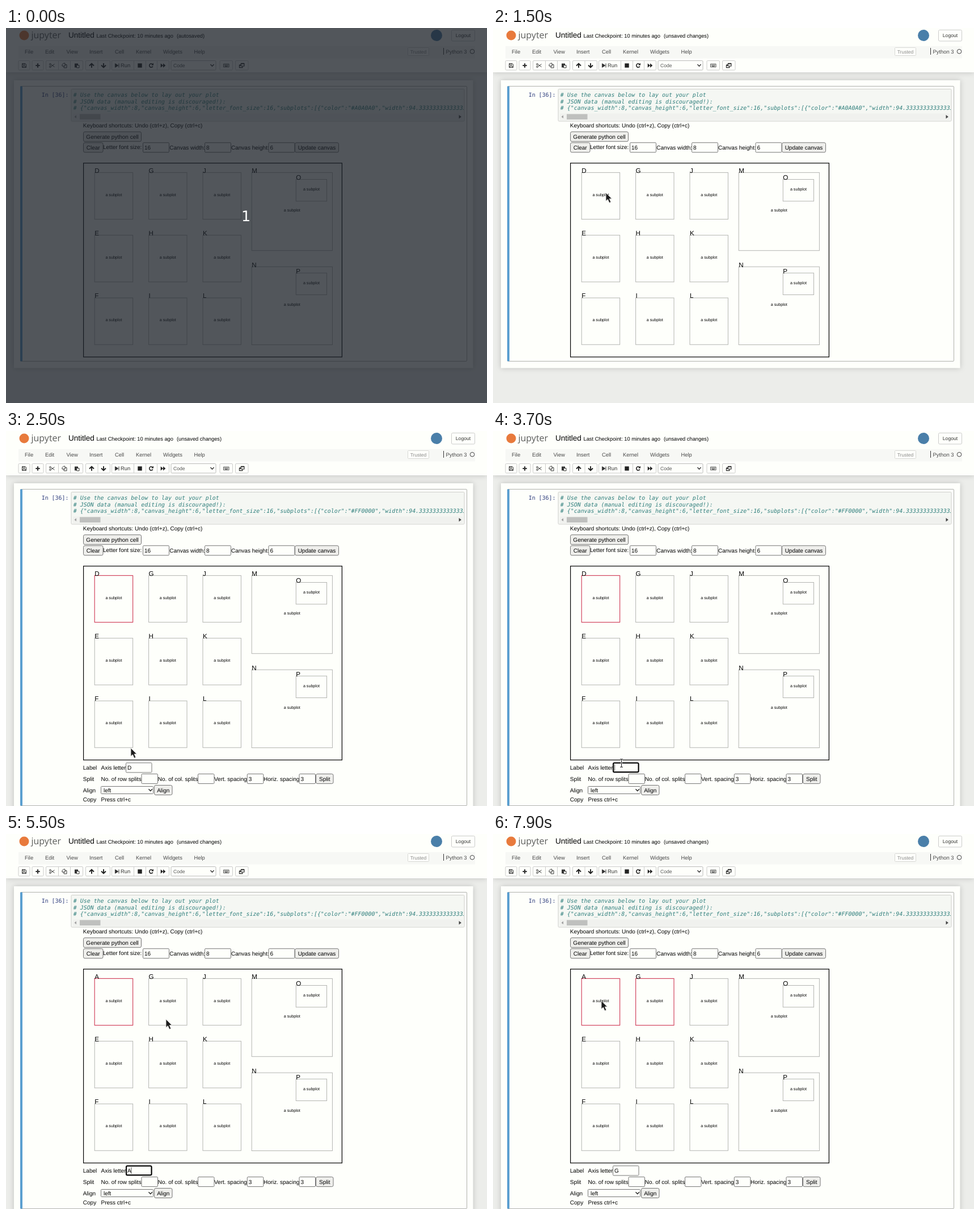
Recreate the animation shown at these times as an HTML page. Size 848 by 660 pixels, loop 8 s.

```html
<!DOCTYPE html>
<html>
<head>
<meta charset="utf-8">
<style>
html, body { margin: 0; width: 100%; height: 100%; overflow: hidden; background: #ecedea; }
svg { display: block; text-rendering: geometricPrecision; font-family: "Liberation Sans", Arial, sans-serif; }
.mono { font: 9.94px "DejaVu Sans Mono", monospace; white-space: pre; }
.code { font-style: italic; fill: #2f7f7c; }
.page { filter: drop-shadow(0 0 5px rgba(87, 87, 87, .3)); }
</style>
</head>
<body>
<svg id="stage" width="848" height="660" viewBox="0 0 848 660"></svg>
<script>
const PAPER = '#fefffb', RED = '#d2455f', GREY = '#b4b5b2';

const text = (x, y, s, size = 10, more = '') =>
  `<text x="${x}" y="${y}" font-size="${size}" ${more}>${s}</text>`;
const mid = 'text-anchor="middle"';
const box = (x, y, w, h, fill, stroke = 'none', r = 0, sw = 1) =>
  `<rect x="${x}" y="${y}" width="${w}" height="${h}" rx="${r}" fill="${fill}" stroke="${stroke}" stroke-width="${sw}"/>`;
const line = (d, stroke = '#333', sw = 1.2) =>
  `<path d="${d}" fill="none" stroke="${stroke}" stroke-width="${sw}"/>`;
const shape = (d, fill = '#333') => `<path d="${d}" fill="${fill}"/>`;
const disc = (x, y, r, fill) => `<circle cx="${x}" cy="${y}" r="${r}" fill="${fill}"/>`;
const button = (x, y, w, label, fill = '#efefec') =>
  box(x, y, w, 17, fill, '#767676', 2.5) + text(x + w / 2, y + 12.2, label, 10, mid);
const input = (x, y, w, value) =>
  box(x, y, w, 17, PAPER, '#767676', 1.5) + text(x + 2.5, y + 12.2, value);

function header(status) {
  const menu = [['File', 33], ['Edit', 69], ['View', 106.5], ['Insert', 147], ['Cell', 192],
    ['Kernel', 229], ['Widgets', 277], ['Help', 331.5]];
  const tools = [[22, 20], [46, 20], [70.5, 65], [140.5, 43], [186.5, 101], [377, 22.5], [404.5, 22.5]];
  return `<g class="page">${box(0, -10, 848, 88, PAPER)}</g>` +
    disc(32, 13, 8.5, '#e87a3c') +
    text(44.5, 18, 'jupyter', 16, 'font-family="Open Sans, sans-serif" fill="#5c5d5c"') +
    text(110, 17.3, 'Untitled', 13.5) +
    text(159.5, 17, 'Last Checkpoint: 10 minutes ago', 9.3) +
    text(301, 17, status, 9.3) +
    disc(759, 13, 10, '#4a7fa9') +
    box(785.5, 3.5, 41, 19.5, PAPER, '#ccc', 2) + text(806, 16.3, 'Logout', 8.6, mid + ' fill="#333"') +
    box(22, 32, 805, 21.5, '#f7f8f5') +
    menu.map(([s, x]) => text(x, 45, s, 9.4, 'fill="#4a4a4a"')).join('') +
    box(708.5, 34.5, 37, 14, PAPER, '#d8d8d5', 1) + text(727, 44.7, 'Trusted', 8.5, mid + ' fill="#888"') +
    line('M771.5 35V47', '#333', 1) + text(775.5, 45, 'Python 3', 9.4, 'fill="#4a4a4a"') +
    '<circle cx="822" cy="41.3" r="3.8" fill="none" stroke="#444"/>' +
    tools.map(([x, w]) => box(x, 57.5, w, 16.5, PAPER, '#ccc', 1.5)).join('') +
    line('M92.5 58V74M113.5 58V74M162 58V74M225.5 58V74M246.5 58V74M266.5 58V74', '#ccc', 1) +
    icons() +
    box(291, 57.5, 79, 16.5, PAPER, '#bbb', 1.5) + text(295, 68.8, 'Code', 8.6, 'fill="#555"') +
    line('M360.5 64l3 3.2 3-3.2', '#333', 1.4);
}

function icons() {
  const arrow = 'M-4 .5L0-3.5 4 .5M0-3V4';
  const at = (x, y, s, turn = 0) => `<g transform="translate(${x} ${y}) rotate(${turn})">${s}</g>`;
  return at(32, 66, line('M-3.5-3.5H2L3.5-2V3.5H-3.5ZM-2-3V-1H1V-3M-2 3V1H2V3', '#333', 1)) +
    at(56, 66, line('M-3.7 0H3.7M0-3.7V3.7', '#333', 2.2)) +
    at(81, 66, line('M-1.5-1.5L4.5 2.5M-1.5 1.5L4.5-2.5M-4.5-2.2a1.5 1.3 0 1 0 3 0a1.5 1.3 0 1 0-3 0M-4.5 2.2a1.5 1.3 0 1 0 3 0a1.5 1.3 0 1 0-3 0', '#444', 1)) +
    at(103, 66, line('M-4-1.5L-1.5-4H1V1H-4ZM1-1.5H4V4H-1V1', '#333', 1)) +
    at(125, 66, shape('M-4-3.5H2V-1H-1V3.5H-4Z') + line('M-.5-.5H4V4H-.5Z', '#333', 1)) +
    at(151, 66, line(arrow, '#222', 1.9)) + at(172, 66, line(arrow, '#222', 1.9), 180) +
    at(195, 66, shape('M-2-3.6L3.5 0-2 3.6Z') + line('M-2.6-3.6V3.6', '#333', 1) + line('M4-3.6V3.6', '#333', 1)) +
    text(202, 69.3, 'Run', 9.4, 'fill="#333"') +
    box(232.3, 62.3, 7.4, 7.4, '#222') +
    at(256, 66, line('M2.8 1.5A3.2 3.2 0 1 1 2-2.5', '#222', 1.6) + shape('M4-4.5V-.5H0Z', '#222')) +
    at(277, 66, shape('M-4.3-3.7L0 0-4.3 3.7ZM0-3.7L4.3 0 0 3.7Z', '#222')) +
    at(388.3, 66, line('M-4.8-2.7H4.8V2.7H-4.8Z', '#444', .9) + line('M-3.5-1H3.5M-3.5.4H3.5', '#444', .8) + line('M-2.3 1.6H2.3', '#444', .8)) +
    at(415.7, 66, line('M-1.5-3.3H4.3V1H-1.5ZM-1.5-.7H-4.3V3.6H1.3V1', '#222', 1.1) + line('M-1.5-3.3H4.3M-4.3-.5H-1.5', '#222', 1.8));
}

function cell(open, color, hover) {
  const bottom = open ? 659.5 : 586.5;
  return `<g class="page">${box(14, 92, 809.5, open ? 600 : 506.5, PAPER)}</g>` +
    box(25.5, 102.5, 787, bottom - 102.5, PAPER, '#b0b1ae', 1.5) +
    box(25, 102.5, 4, bottom - 102.5, '#5b9fd0', 'none', 1) +
    text(62.7, 121.3, 'In [36]:', 9.94, 'class="mono" fill="#303f7f"') +
    box(115, 107.5, 693, 56.5, '#f5f7f3', '#cfcfcc', 1.5) +
    '<clipPath id="clip"><path d="M116 108H807V150H116Z"/></clipPath><g clip-path="url(#clip)">' +
    ['# Use the canvas below to lay out your plot',
      '# JSON data (manual editing is discouraged!):',
      `# {"canvas_width":8,"canvas_height":6,"letter_font_size":16,"subplots":[{"color":"${color}","width":94.33333333333333`
    ].map((s, i) => text(118.8, 121.3 + i * 11.2, s, 9.94, 'class="mono code"')).join('') + '</g>' +
    box(118, 150.5, 687, 11.5, '#f0f1ee') + box(130, 151.5, 36.5, 9.5, '#bfc0be') +
    shape('M124 153.5V159L120.5 156.3Z', '#a0a0a0') + shape('M798.5 153V159.6L802.8 156.3Z', '#444') +
    text(135.8, 175, 'Keyboard shortcuts: Undo (ctrl+z), Copy (ctrl+c)', 9.95) +
    button(136.5, 182.7, 102, 'Generate python cell', hover ? '#e2e3e0' : undefined) +
    button(136.5, 201.8, 34.5, 'Clear') + text(171, 213.3, 'Letter font size:') + input(241.5, 201.8, 46, '16') +
    text(288.3, 213.5, 'Canvas width:') + input(350.5, 201.8, 46, '8') +
    text(397, 213.5, 'Canvas height:') + input(463, 201.8, 46, '6') + button(509.5, 201.8, 77, 'Update canvas');
}

function subplots(first, redA, redG) {
  const plot = (name, x, y, w, h, red) =>
    box(x, y, w, h, 'none', red ? RED : GREY, 0, red ? 1.2 : 1) +
    text(x, y + .4, name, 11.6) + text(x + w / 2, y + h / 2 + .2, 'a subplot', 7.15, mid);
  let out = box(136.6, 237.8, 455.8, 341.2, 'none', '#000', 0, 1.2);
  [first, ...'EFGHIJKL'].forEach((name, i) => {
    const col = Math.floor(i / 3), row = i % 3;
    out += plot(name, 156.2 + col * 95.4, 254.4 + row * 110.3, 67.4, 82.2, i == 0 && redA || i == 3 && redG);
  });
  return out + plot('M', 433.2, 254.4, 142.2, 137.3) + plot('N', 433.2, 420.2, 142.2, 137.3) +
    plot('O', 511.3, 266.5, 54.2, 38.3) + plot('P', 511.3, 431.2, 54.2, 38.3);
}

function panel(letter, focus, caret) {
  return text(135.8, 596.3, 'Label') + text(167.5, 596, 'Axis letter') + input(211.5, 584, 45.5, letter) +
    (focus ? box(212, 584.3, 44.5, 16, 'none', '#000', 2, 2) : '') +
    (caret ? box({ D: 221.5, A: 220.5 }[letter] || 214, 586.5, .8, 11.5, '#222') : '') +
    text(135.8, 616, 'Split') + text(167.5, 615.7, 'No. of row splits') + input(239, 603.6, 28.5, '') +
    text(267.8, 615.7, 'No. of col. splits') + input(338.5, 603.6, 28.5, '') +
    text(367, 615.7, 'Vert. spacing') + input(425.3, 603.6, 28.5, '3') +
    text(454, 615.7, 'Horiz. spacing') + input(517, 603.6, 28.5, '3') + button(546.5, 603.6, 30.5, 'Split') +
    text(135.8, 635.6, 'Align') + box(167.5, 625.5, 92, 13, PAPER, '#767676', 1) + text(172, 635.5, 'left') +
    line('M251.5 630.3l3.2 3.2 3.2-3.2', '#222', 1.4) + button(261.5, 623.5, 31.5, 'Align') +
    text(135.8, 652.2, 'Copy') + text(167.5, 652.2, 'Press ctrl+c');
}

// time, x, y of the pointer
const path = [[700, 236, 192], [800, 275, 225], [900, 238, 265], [1000, 199, 290], [2100, 199, 290],
  [2200, 194, 330], [2300, 196, 430], [2400, 208, 515], [2500, 220, 558], [2700, 226, 580], [2900, 226.5, 584.5],
  [5100, 226.5, 584.5], [5200, 233, 555], [5300, 262, 455], [5400, 284, 365], [5500, 282, 326], [5600, 278, 310],
  [5700, 278, 310], [5800, 279, 303.5], [7700, 279, 303.5], [7900, 191, 293.5], [8000, 191, 293.5]];

function pointer(t) {
  if (t < 700) return '';
  const i = path.findIndex(p => p[0] > t), [t0, x0, y0] = path[i - 1], [t1, x1, y1] = path[i];
  const k = (t - t0) / (t1 - t0), x = x0 + (x1 - x0) * k, y = y0 + (y1 - y0) * k;
  const beam = 'M-2.5-7H2.5M0-7V7M-2.5 7H2.5';
  const arrow = '<path d="M0 0V14.5L3.4 11.6 6 17.6 8.8 16.4 6.2 10.6H10.5Z" fill="#1c1c1c" stroke="#e4e4e0" stroke-width=".9"/>';
  return `<g transform="translate(${x} ${y})">` +
    (y > 579 ? line(beam, '#fff', 2.6) + line(beam, '#222', 1.1) : arrow) + '</g>';
}

function scene(t) {
  const open = t >= 1600, focus = t >= 3300 && t < 6000;
  const letter = t < 3700 ? 'D' : t < 4100 ? '' : t < 6100 ? 'A' : 'G';
  const label = t < 3800 ? 'D' : t < 4200 ? '' : 'A';
  const caret = focus && !(t >= 4800 && t < 5300);
  return box(0, 0, 848, 660, '#ecedea') +
    cell(open, open ? '#FF0000' : '#A0A0A0', t == 700) +
    header(t < 1500 ? '(autosaved)' : '(unsaved changes)') +
    subplots(label, open, t >= 6100) +
    (open ? panel(letter, focus, caret) : '') + pointer(t) +
    (t < 100 ? box(0, 0, 848, 660, 'rgba(28,33,42,.76)') +
      text(423, 340, '1', 25.5, mid + ' fill="#fff" font-family="DejaVu Sans, sans-serif"') : '');
}

const stage = document.getElementById('stage');
let shown = -1;
function tick() {
  const t = Math.floor(performance.now() % 8000 / 100) * 100;
  if (t != shown) stage.innerHTML = scene(shown = t);
  requestAnimationFrame(tick);
}
tick();
</script>
</body>
</html>
```
